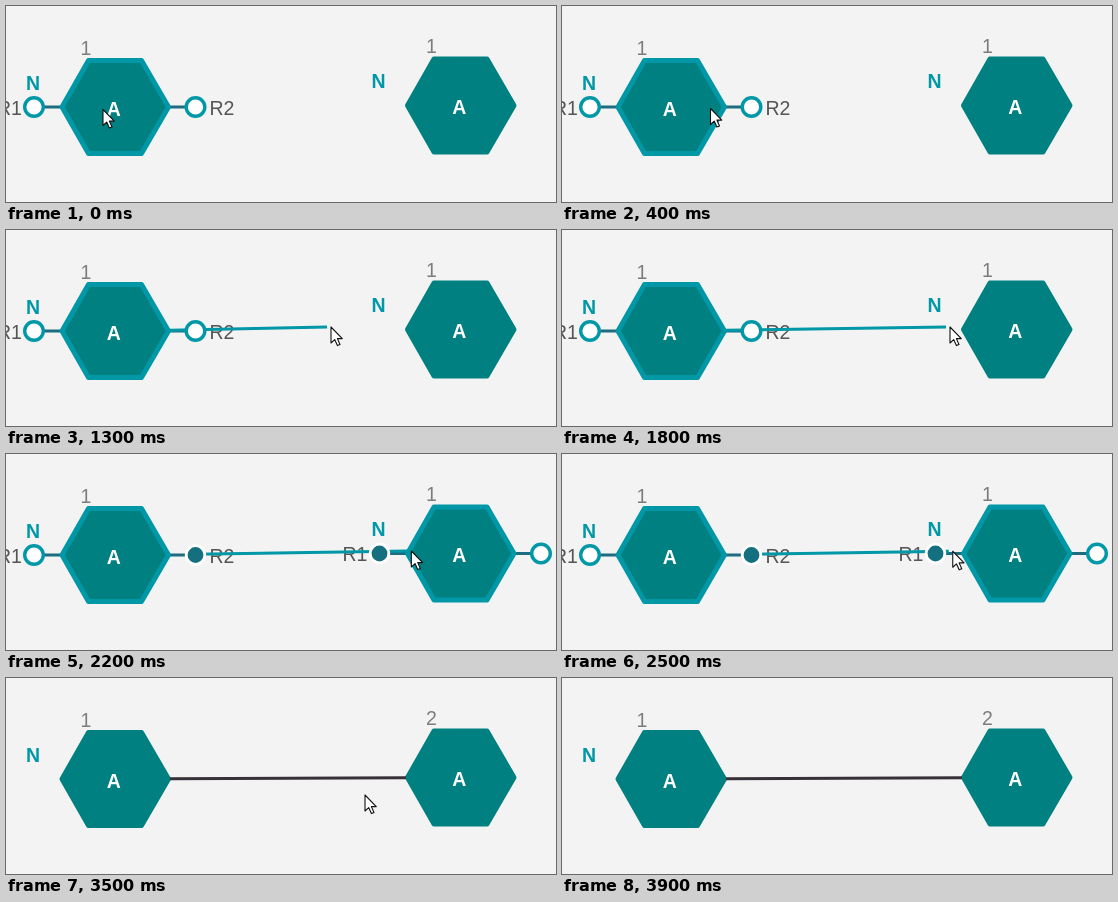
An HTML page for the animation above (4000 ms loop, 550 by 196 pixels).

```html
<!DOCTYPE html>
<html lang="en">
<head>
<meta charset="utf-8">
<title>Connecting two nodes</title>
<style>
  html, body { margin: 0; width: 100%; height: 100%; overflow: hidden; background: #f3f3f3; }
  svg { display: block; }
  text { font: 19.5px "Liberation Sans", Arial, sans-serif; fill: #555; }
  .num { fill: #7d7d7d; }
  .name { fill: #0097a7; font-weight: bold; }
  .letter { fill: #fff; font-weight: bold; text-anchor: middle; }
  .hex { fill: #008080; stroke-width: 5; stroke-linejoin: round; }
  .stub { stroke: #1d6c80; stroke-width: 3; }
  .cursor path { fill: #fff; stroke: #111; stroke-width: 1.1; stroke-linejoin: round; }
</style>
</head>
<body>
<svg width="550" height="196" viewBox="0 0 550 196">
  <g id="back"></g>
  <line id="link" stroke-width="3"/>
  <g id="front"></g>
  <g class="cursor" id="arrow">
    <path d="M0 0V16L3.7 12.6 6.4 18.6 9 17.5 6.4 11.6H11.3Z"/>
  </g>
  <g class="cursor" id="hand">
    <path d="M-1.8 13V1.6C-1.8-.6 1.6-.6 1.6 1.6V8C2 6 5 6.3 5 8.6 5.5 6.9 8.2 7.2 8.2 9.4 8.8 8 11.2 8.4 11.2 10.6V16C11.2 18 9.4 19.5 9.4 23H.8C.6 20-2.4 18-4.8 13.6-6 11.4-3.6 10.4-1.8 13Z"/>
    <path d="M1.6 8V12M5 9V12.5M8.2 10V13" fill="none"/>
  </g>
</svg>
<script>
const LOOP = 4000, STEP = 100;
const BEGIN_DRAG = 800, SNAP = 2000, DROP = 3200, CLEAR = 3400, GONE = 3850;
const TEAL = '#0097a7', DARK = '#14707f';

// time, x, y of the pointer tip
const track = [
  [0, 97, 103.5], [200, 108, 104], [600, 189, 101], [700, 196, 100], [800, 196, 100],
  [1000, 236, 99], [1300, 325, 97], [1800, 388, 97], [2000, 404, 97], [2300, 406, 97],
  [2700, 375.5, 97.5], [3200, 375.5, 98], [3400, 368, 106], [3600, 350, 128], [3850, 325, 200]
];

const $ = id => document.getElementById(id);
const back = $('back'), front = $('front'), link = $('link');

function add(parent, tag, attrs, text) {
  const el = document.createElementNS('http://www.w3.org/2000/svg', tag);
  set(el, attrs);
  if (text) el.textContent = text;
  parent.append(el);
  return el;
}

function set(el, attrs) {
  for (const key in attrs) el.setAttribute(key, attrs[key]);
}

function show(el, on) {
  el.style.display = on ? '' : 'none';
}

function makeNode(dx, dy) {
  const transform = `translate(${dx} ${dy})`;
  const base = add(back, 'g', { transform });
  const top = add(front, 'g', { transform });
  const extras = add(base, 'g', {});
  add(extras, 'path', { class: 'stub', d: 'M28 101H56M162 101H190' });
  add(extras, 'text', { x: -9, y: 108.5 }, 'R1');
  add(extras, 'text', { x: 203.5, y: 108.5 }, 'R2');
  const hex = add(base, 'path', { class: 'hex', d: 'M56 101L82.5 54.5H135.5L162.5 101 135.5 147.5H82.5Z' });
  const num = add(base, 'text', { class: 'num', x: 74.5, y: 48.5 }, '1');
  const name = add(base, 'text', { class: 'name', x: 20, y: 83.5 }, 'N');
  add(base, 'text', { class: 'letter', x: 107.7, y: 109.5 }, 'A');
  const ports = [28, 189.5].map(cx => add(top, 'circle', { cx, cy: 101, r: 9.3 }));
  return { hex, num, name, extras, top, ports };
}

function drawNode(node, active, joined) {
  set(node.hex, { stroke: active ? TEAL : '#008080' });
  show(node.extras, active);
  show(node.top, active);
  node.ports.forEach((port, i) => set(port, i === joined
    ? { fill: DARK, stroke: '#fff', 'stroke-width': 2.8 }
    : { fill: '#fff', stroke: TEAL, 'stroke-width': 3.4 }));
}

function pointer(t) {
  const i = Math.max(1, track.findIndex(p => p[0] >= t));
  const [t0, x0, y0] = track[i - 1], [t1, x1, y1] = track[i];
  const k = (t - t0) / (t1 - t0);
  return [x0 + (x1 - x0) * k, y0 + (y1 - y0) * k];
}

const left = makeNode(0, 0), right = makeNode(345.5, -1.5);

function draw(t) {
  const [x, y] = pointer(Math.min(t, GONE));
  const dragging = t >= BEGIN_DRAG && t < DROP;
  const snapped = t >= SNAP && t < DROP;
  const done = t >= DROP;
  drawNode(left, t < CLEAR, snapped ? 1 : -1);
  drawNode(right, t >= SNAP && t < CLEAR, snapped ? 0 : -1);
  right.num.textContent = done ? '2' : '1';
  show(right.name, t < CLEAR);

  show(link, dragging || done);
  set(link, done
    ? { x1: 164, y1: 100.7, x2: 400, y2: 99.7, stroke: '#383038' }
    : { x1: snapped ? 189.5 : 164, y1: 100.3, x2: x - 4, y2: y, stroke: TEAL });

  const hand = (t >= 600 && t < 900) || (t >= 2600 && t < CLEAR);
  show($('hand'), hand);
  show($('arrow'), !hand && t < GONE);
  const at = { transform: `translate(${x} ${y})` };
  set($('hand'), at);
  set($('arrow'), at);
}

const start = performance.now();
function tick() {
  const t = (performance.now() - start) % LOOP;
  draw(Math.floor(t / STEP) * STEP);
  requestAnimationFrame(tick);
}
tick();
</script>
</body>
</html>
```
